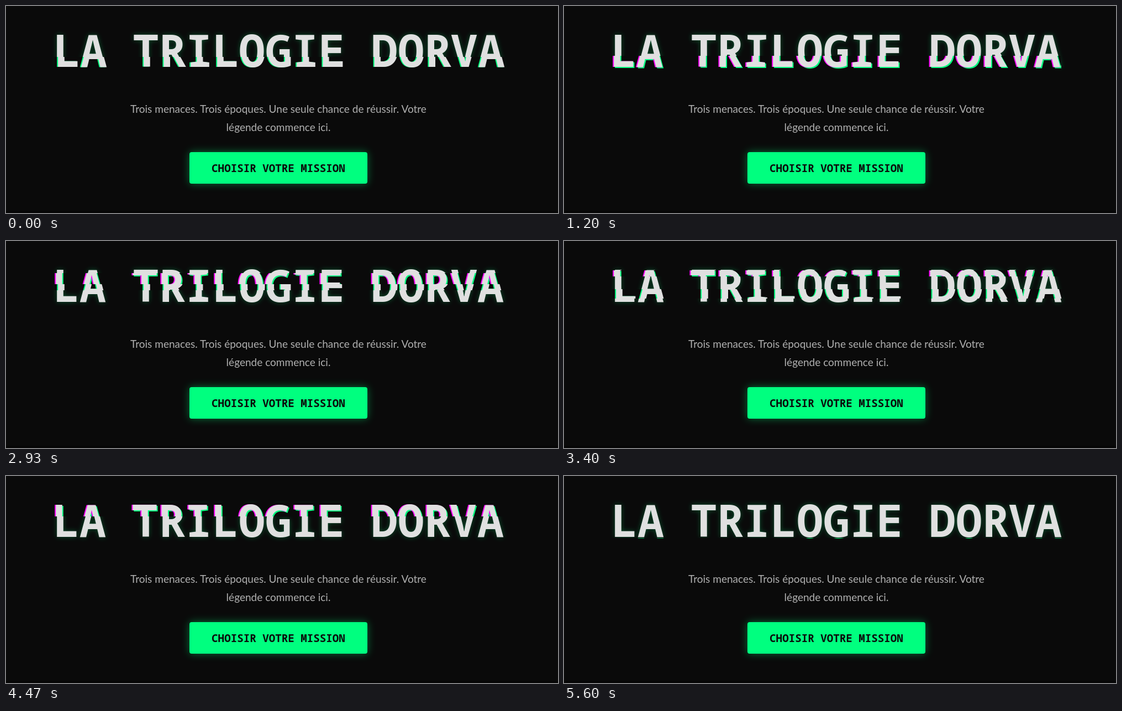
An HTML page that plays this animation: 999 by 374 pixels, repeating every 5.67 s.

```html
<!DOCTYPE html>
<html lang="fr">
<head>
<meta charset="utf-8">
<title>La trilogie Dorva</title>
<style>
  html, body { margin: 0; width: 100%; height: 100%; overflow: hidden; background: #0a0a0a; }
  svg { display: block; width: 999px; height: 374px; }
  .mono { font-family: "Roboto Mono", "Noto Sans Mono", monospace; font-weight: 700; white-space: pre; }
  .title { font-size: 80px; }
  .lead { font: 19.05px Lato, sans-serif; fill: #b0b0b0; text-anchor: middle; }
  .label { font-size: 19.2px; fill: #0a0a0a; text-anchor: middle; }
  .paper { fill: #0a0a0a; }
  .ink { fill: #e0e0e0; }
  .green { fill: #00ff7f; }
  .magenta { fill: #ff00ff; }
</style>
</head>
<body>
<svg viewBox="0 0 999 374">
  <defs>
    <text id="word" class="mono title" x="85" y="110">LA TRILOGIE DORVA</text>
    <filter id="textGlow" filterUnits="userSpaceOnUse" x="50" y="10" width="900" height="140">
      <feGaussianBlur stdDeviation="5"/>
    </filter>
    <filter id="buttonGlow" filterUnits="userSpaceOnUse" x="280" y="210" width="430" height="164">
      <feGaussianBlur stdDeviation="7.5"/>
    </filter>
    <clipPath id="rightClip"><rect id="rightBand" x="87" width="816"/></clipPath>
    <clipPath id="leftClip"><rect id="leftBand" x="83" width="818"/></clipPath>
  </defs>

  <rect class="paper" width="999" height="374"/>
  <rect y="370" width="999" height="4" fill="#060606"/>

  <use href="#word" class="green" opacity=".28" filter="url(#textGlow)"/>
  <use href="#word" class="ink"/>

  <g clip-path="url(#rightClip)">
    <rect class="paper" x="87" y="30" width="816" height="96"/>
    <use href="#word" class="green"/>
    <use href="#word" class="ink" x="2"/>
  </g>

  <g clip-path="url(#leftClip)">
    <rect class="paper" x="83" y="30" width="816" height="96"/>
    <use href="#word" class="green" y="2"/>
    <use href="#word" class="magenta" x="-4"/>
    <use href="#word" class="ink" x="-2"/>
  </g>

  <text class="lead" x="493" y="193">Trois menaces. Trois époques. Une seule chance de réussir. Votre</text>
  <text class="lead" x="493" y="226">légende commence ici.</text>

  <rect class="green" x="332" y="264" width="322" height="57" rx="4" opacity=".4" filter="url(#buttonGlow)"/>
  <rect class="green" x="332" y="264" width="322" height="57" rx="4"/>
  <text class="mono label" x="493" y="300">CHOISIR VOTRE MISSION</text>
</svg>
<script>
  const LOOP = 5670;
  const STEP = 1000 / 15;
  const ABOVE = 20;   // a band parked clear of the title
  const BELOW = 120;  // past the title's lowest pixel

  // Turning points of each displaced band; its edges glide evenly between them.
  const pose = (time, top, bottom = top) => ({ time, top, bottom });
  const rightPath = [
    pose(0, 92, BELOW), pose(600, 56), pose(1870, 56),
    pose(3930, 98, BELOW), pose(4470, 94)
  ];
  const leftPath = [
    pose(0, 48), pose(1200, 90, BELOW), pose(1770, ABOVE),
    pose(2270, 93, BELOW), pose(2930, 58, 78), pose(3930, 48),
    pose(4470, 48, 73), pose(5600, 112, BELOW)
  ];

  const mix = (a, b, k) => Math.round(a + (b - a) * k);

  function setBand(id, path, time) {
    const from = path.findLast(p => p.time <= time);
    const to = path.find(p => p.time > time) || from;
    const k = (time - from.time) / (to.time - from.time || 1);
    const top = mix(from.top, to.top, k);
    const band = document.getElementById(id);
    band.setAttribute("y", top);
    band.setAttribute("height", mix(from.bottom, to.bottom, k) - top);
  }

  function render(elapsed) {
    const step = Math.floor((elapsed % LOOP + 4) / STEP);
    const time = Math.min(5600, Math.round(step * STEP / 10) * 10);
    setBand("rightBand", rightPath, time);
    setBand("leftBand", leftPath, time);
  }

  const start = performance.now();
  function tick() {
    render(performance.now() - start);
    requestAnimationFrame(tick);
  }
  tick();
</script>
</body>
</html>
```
